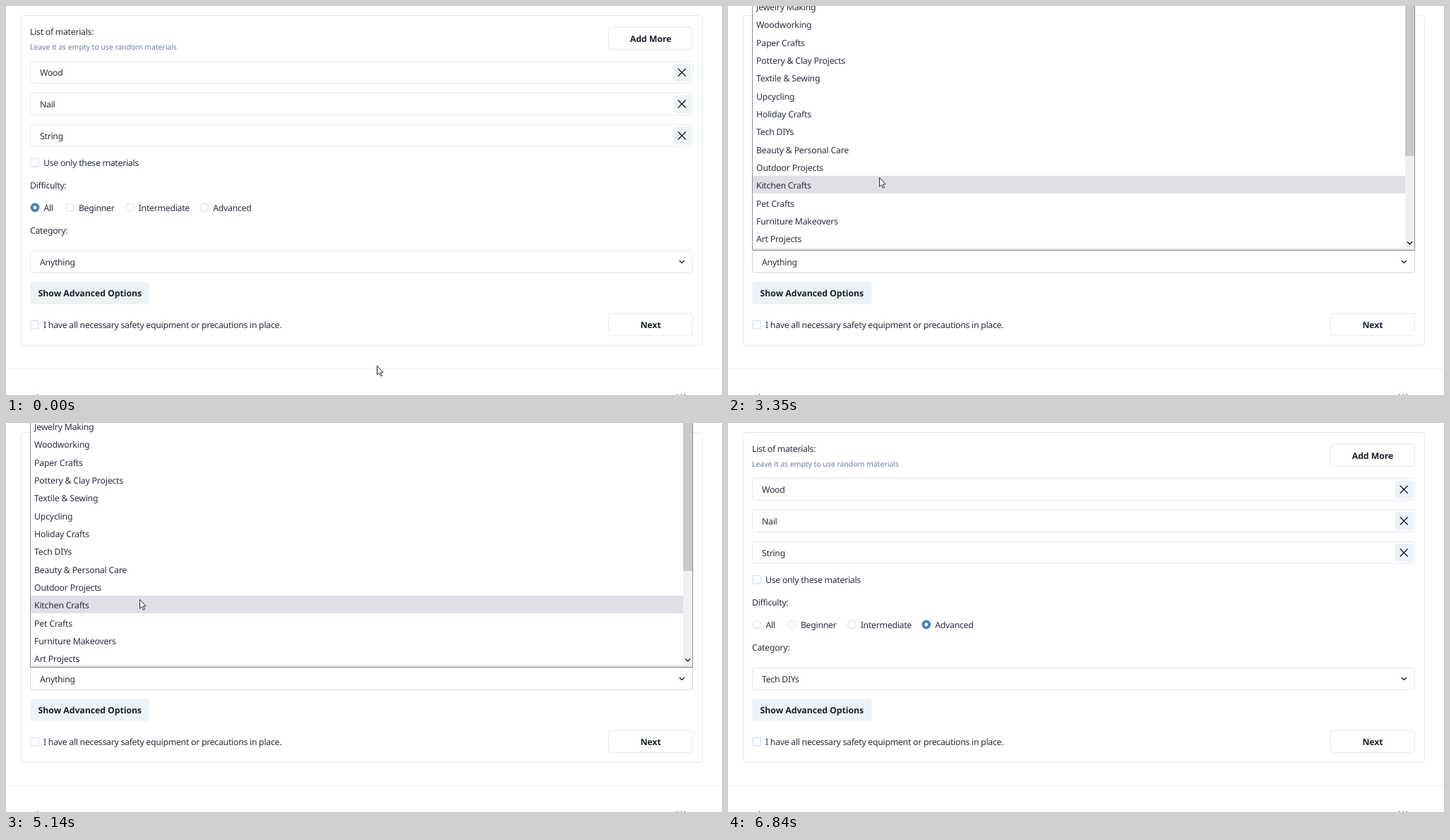
An HTML page for the animation above (7240 ms loop, 1014 px wide and 552 px high).

```html
<!DOCTYPE html>
<html lang="en">
<head>
<meta charset="utf-8">
<title>Project form</title>
<style>
html, body { margin: 0; width: 100%; height: 100%; overflow: hidden; background: #fff; }
svg { display: block; }
text { font: 12.3px "Noto Sans", "Open Sans", sans-serif; letter-spacing: -.28px; fill: #2a2f3c; text-rendering: geometricPrecision; }
#list text { letter-spacing: -.21px; }
.bold { font-weight: 600; letter-spacing: -.06px; text-anchor: middle; fill: #1a202c; }
.hint { font-size: 10.6px; letter-spacing: -.08px; fill: #718096; }
.box { fill: #fff; stroke: #e2e8f0; }
.hover { stroke: #cbd5e0; }
.check { fill: #fff; stroke: #dde4f2; stroke-width: 1.5; }
.soft { fill: #edf2f7; }
.icon { fill: none; stroke: #1a202c; stroke-width: 1.4; }
.radio { fill: #fff; stroke: #e0e6ef; stroke-width: 1.4; }
.radio.on { stroke: #4a84bd; stroke-width: 4; }
</style>
</head>
<body>
<svg width="1014" height="552" viewBox="0 0 1014 552">
  <defs><clipPath id="listClip"><rect x="35" width="924" height="343"/></clipPath></defs>
  <g id="form"></g>
  <g id="popup">
    <rect x="34.5" y="-5" width="938" height="351.5" fill="#fff" stroke="#8d8f96"/>
    <path d="M35 344.5H972" stroke="#e3e3e5" stroke-width="2"/>
    <rect id="mark" x="35" width="924" height="25" fill="#e0dfe6"/>
    <g clip-path="url(#listClip)"><g id="list"></g></g>
    <rect x="959" width="13" height="344" fill="#f0f0f0"/>
    <rect id="thumb" x="959" width="13" fill="#c9cbca"/>
    <path class="icon" d="M962 334.5l3.5 3.5 3.5-3.5"/>
  </g>
  <path id="cursor" d="M.5.5V13.3L3.4 10.6 5.5 15.3 7.5 14.4 5.4 9.9H9.2Z" fill="#fff" stroke="#2a2d3a"/>
</svg>
<script>
const LOOP = 7240, ROW = 25.33, FIRST = 15.4;
const OPEN = 2340, ENTER = 3080, CLOSE = 6020, LEAVE = 6840;
const $ = id => document.getElementById(id);

function add(parent, tag, attrs, label) {
  const el = document.createElementNS("http://www.w3.org/2000/svg", tag);
  for (const k in attrs) el.setAttribute(k, attrs[k]);
  if (label) el.textContent = label;
  return parent.appendChild(el);
}
const form = $("form"), list = $("list");
// Labels are placed by their middle line.
const text = (x, mid, label, cls = "") =>
  add(form, "text", { x, y: Math.round(mid + 4.5), class: cls }, label);
const box = (x, y, width, height, cls = "box", rx = 4) =>
  add(form, "rect", { x, y, width, height, rx, class: cls });
const path = d => add(form, "path", { d, class: "icon" });
const button = (x, y, w, label, cls) => {
  box(x, y, w, 31.5, cls);
  text(x + w / 2, y + 16.2, label, "bold");
};
const checkbox = (mid, label) => {
  box(35, mid - 5.7, 11.4, 11.4, "check", 1);
  text(53, mid, label);
};
const field = (y, label) => {
  const el = box(34.5, y, 938, 31);
  return { el, y, label: text(48, y + 16, label) };
};

box(21.5, 13.5, 965, 468);
text(34, 36.3, "List of materials:");
text(34, 57, "Leave it as empty to use random materials", "hint");
button(853.5, 29.8, 119, "Add More");
const fields = ["Wood", "Nail", "String"].map((name, i) => {
  const y = 78.6 + i * 44.8, f = field(y, name);
  box(945, y + 3.2, 25.5, 25.5, "soft");
  path(`M951.7 ${y + 10.2}l11 11m0-11l-11 11`);
  return f;
});
checkbox(222.3, "Use only these materials");
text(34, 254.3, "Difficulty:");
const radios = [[41, "All"], [90.5, "Beginner"], [175.3, "Intermediate"], [280.8, "Advanced"]].map(([cx, label]) => {
  text(cx + 12.4, 286.3, label);
  return add(form, "circle", { cx, cy: 286 });
});
text(34, 318.3, "Category:");
const select = field(347.3, "Anything");
fields.push(select);
path("M953.7 361.2l3.5 3.4 3.5-3.4");
button(34.2, 391.5, 169.3, "Show Advanced Options", "soft");
checkbox(452.3, "I have all necessary safety equipment or precautions in place.");
button(853.5, 436.3, 119, "Next");
add(form, "path", { d: "M0 514.5H1014", stroke: "#f0f1f3" });
add(form, "path", { d: "M44.5 550.5V552M951.5 550.5L950 552M956.5 550.5V552M960.5 550.5L962 552", stroke: "#555" });

["Jewelry Making", "Woodworking", "Paper Crafts", "Pottery & Clay Projects", "Textile & Sewing", "Upcycling",
 "Holiday Crafts", "Tech DIYs", "Beauty & Personal Care", "Outdoor Projects", "Kitchen Crafts", "Pet Crafts",
 "Furniture Makeovers", "Art Projects", "Photography DIYs", "Musical Instruments", "Car & Mechanical Crafts",
 "Eco-friendly Crafts", "Baking & Food Crafts", "Travel & Adventure DIYs"]
  .forEach((name, i) => add(list, "text", { x: 40, y: Math.round(FIRST + i * ROW + 4.5) }, name));

// Each move: start, end, and where the pointer arrives.
const moves = [
  [0, 680, 110, 287],      // Beginner
  [740, 1500, 211, 291],   // Intermediate
  [1500, 1850, 305, 278],  // Advanced
  [1880, 2270, 234, 368],  // open the select
  [2600, 2880, 232, 348],
  [3010, 3350, 214, 243],
  [3350, 3840, 192, 198],
  [3840, 4100, 183, 278],
  [4600, 5550, 193, 231],
  [5550, 5850, 182, 190],  // Tech DIYs
  [6090, 6510, 187, 347],
  [6650, 6780, 555, 513]
];

function ease(t, from, to) {
  const p = Math.min(1, Math.max(0, (t - from) / (to - from)));
  return p * p * (3 - 2 * p);
}
const pointerAt = t => moves.reduce(([x, y], [from, to, nx, ny]) => {
  const e = ease(t, from, to);
  return [x + (nx - x) * e, y + (ny - y) * e];
}, [525, 510]);
const scrollAt = t => t < ENTER ? 0
  : Math.round(14 + 151 * ease(t, 4110, 4390) - 165 * ease(t, 4800, 5200));
const show = (id, on) => $(id).style.display = on ? "" : "none";

function draw(t) {
  const [x, y] = pointerAt(t), scroll = scrollAt(t);
  const open = t >= OPEN && t < CLOSE;

  $("cursor").setAttribute("transform", `translate(${Math.round(x)} ${Math.round(y)})`);
  show("cursor", t < LEAVE);

  const picked = [810, 1500, 1850].filter(s => t >= s).length;
  radios.forEach((r, i) => {
    r.setAttribute("class", i === picked ? "radio on" : "radio");
    r.setAttribute("r", i === picked ? 4.4 : 5.8);
  });

  for (const f of fields) {
    const over = t < LEAVE && y >= f.y && y < f.y + 32;
    f.el.setAttribute("class", over || (open && f === select) ? "box hover" : "box");
  }
  select.label.textContent = t < CLOSE ? "Anything" : "Tech DIYs";

  show("popup", open);
  list.setAttribute("transform", `translate(0 ${-scroll})`);
  $("thumb").setAttribute("height", Math.round(202 + scroll * .77));
  // The marked row stays with the list while the wheel turns.
  const hoverScroll = t > 4100 && t < 4660 ? 14 : scroll;
  const row = Math.round((y + hoverScroll - FIRST) / ROW);
  $("mark").setAttribute("y", Math.floor(FIRST + (row - .5) * ROW - scroll - .6));
  show("mark", t >= ENTER);
}

function frame() {
  draw(performance.now() % LOOP);
  requestAnimationFrame(frame);
}
frame();
</script>
</body>
</html>
```
